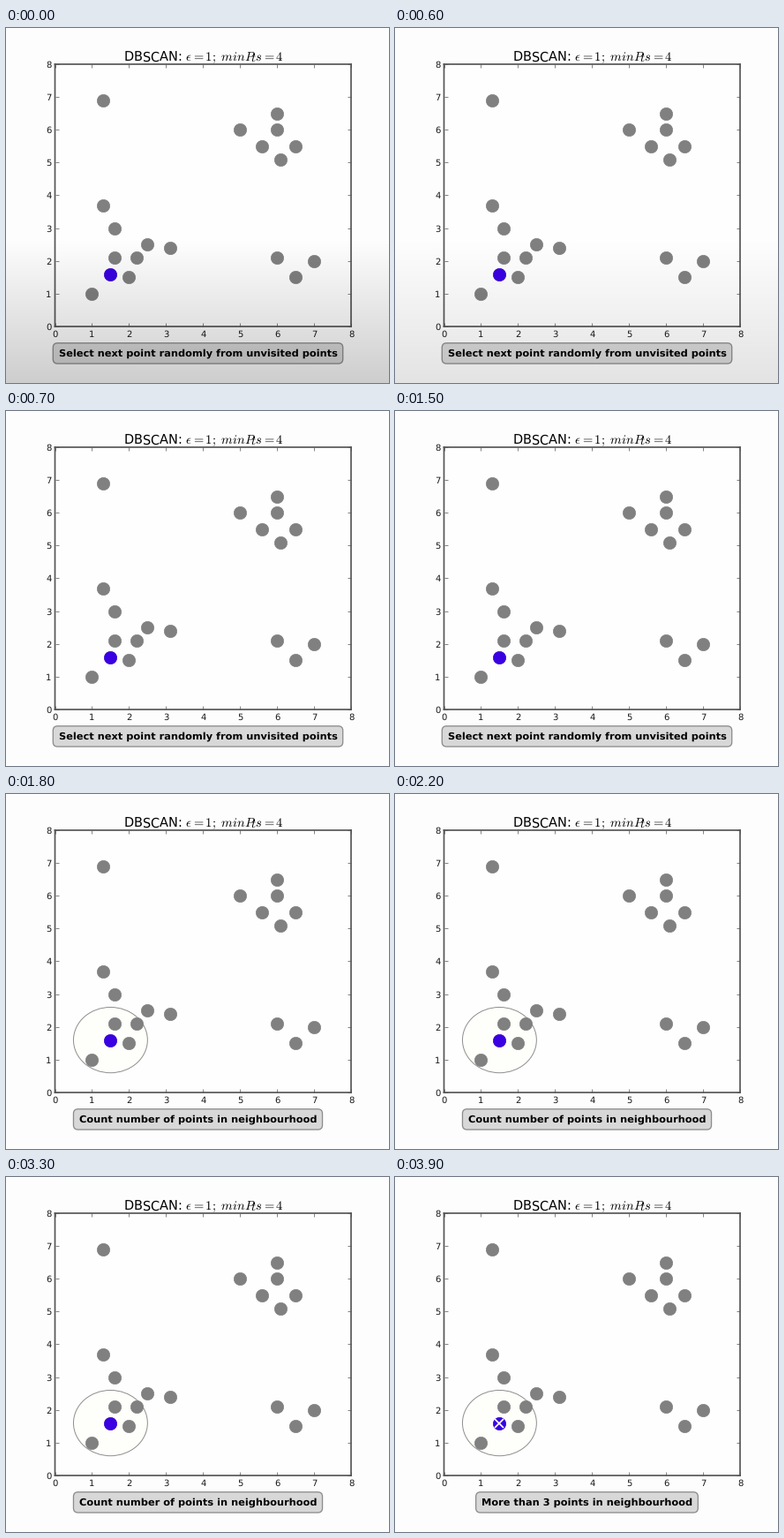
A matplotlib script that plays this animation: 434 by 402 pixels, repeating every 5 s.

```python
import numpy as np
import matplotlib.pyplot as plt
from matplotlib.animation import FuncAnimation
from matplotlib.patches import Circle

W, H, DPI = 434, 402, 72          # at 72 dpi one point is one pixel
STEP, FRAMES = 100, 50
GREY, BLUE, BLUE_EDGE = "#808080", "#3a00e2", "#3200c8"
LEFT, RIGHT, TOP, BOTTOM = 55.5, 391, 41, 338
SHADE_TOP = 238

START = (1.5, 1.6)
POINTS = [
    (1, 1), (2, 1.5), (1.6, 2.1), (2.2, 2.1), (2.5, 2.5), (3.1, 2.4),
    (1.6, 3), (1.3, 3.7), (1.3, 6.9),
    (5, 6), (6, 6), (6, 6.5), (5.6, 5.5), (6.5, 5.5), (6.1, 5.1),
    (6, 2.1), (7, 2), (6.5, 1.5),
]

# Start time in ms and caption of each stage
STAGES = [
    (0, "Select next point randomly from unvisited points"),
    (1800, "Count number of points in neighbourhood"),
    (3900, "More than 3 points in neighbourhood"),
]

plt.rcParams["font.family"] = "DejaVu Sans"
plt.rcParams["mathtext.fontset"] = "cm"
plt.rcParams["text.hinting"] = "none"

fig = plt.figure(figsize=(W / DPI, H / DPI), dpi=DPI, facecolor="#fdfdfd")

# Scatter plot
ax = fig.add_axes([LEFT / W, 1 - BOTTOM / H, (RIGHT - LEFT) / W, (BOTTOM - TOP) / H])
ax.set(xlim=(0, 8), ylim=(0, 8), xticks=range(9), yticks=range(9), facecolor="#fefefe")
ax.tick_params(direction="in", top=True, right=True, length=4, width=0.8,
               color="#666666", labelcolor="#1a1a1a", pad=4, labelsize=10)
for spine in ax.spines.values():
    spine.set(linewidth=1.7, color="#555555", snap=False)


def dots(points, color, edge, z):
    x, y = zip(*points)
    ax.plot(x, y, "o", ms=14.4, mfc=color, mec=edge, mew=0.6, zorder=z, snap=False)


hood = ax.add_patch(Circle(START, 1, fc="#fefefa", ec="#909090", lw=1, zorder=1.5))
dots(POINTS, GREY, GREY, 3)
dots([START], BLUE, BLUE_EDGE, 4)
cross, = ax.plot(*START, "x", ms=10.5, mew=1.7, color="white", zorder=5, snap=False)

# Pixel-space layer for the title, the caption and the shade
top = fig.add_axes([0, 0, 1, 1], zorder=5)
top.set(xlim=(0, W), ylim=(H, 0))
top.axis("off")
top.text(223.5, 37.4, r"DBSCAN: $\epsilon=1;\ minP\!ts=4$", size=14.5,
         ha="center", va="baseline")
caption = top.text(217.5, 368.4, "", size=11.4, weight="bold", ha="center", va="center",
                   bbox=dict(boxstyle="round,pad=0.55,rounding_size=0.45",
                             fc="#d8d8d8", ec="#8c8c8c", lw=1.3))

rows = np.arange(H) + 0.5
ramp = np.zeros((H, 1, 4))
ramp[:, 0, 3] = 0.19 * np.clip((rows - SHADE_TOP) / (H - SHADE_TOP), 0, 1)
shade = top.imshow(ramp, extent=(0, W, H, 0), aspect="auto",
                   interpolation="nearest", zorder=10)


def update(i):
    t = i * STEP
    stage = max(k for k, (start, _) in enumerate(STAGES) if t >= start)
    caption.set_text(STAGES[stage][1])
    hood.set_visible(stage >= 1)
    cross.set_visible(stage >= 2)
    shade.set_visible(t < 700)
    shade.set_alpha(1 if t < 600 else 0.55)
    return hood, cross, caption, shade


anim = FuncAnimation(fig, update, frames=FRAMES, interval=STEP,
                     repeat=True, repeat_delay=0, blit=False)
plt.show()
```
